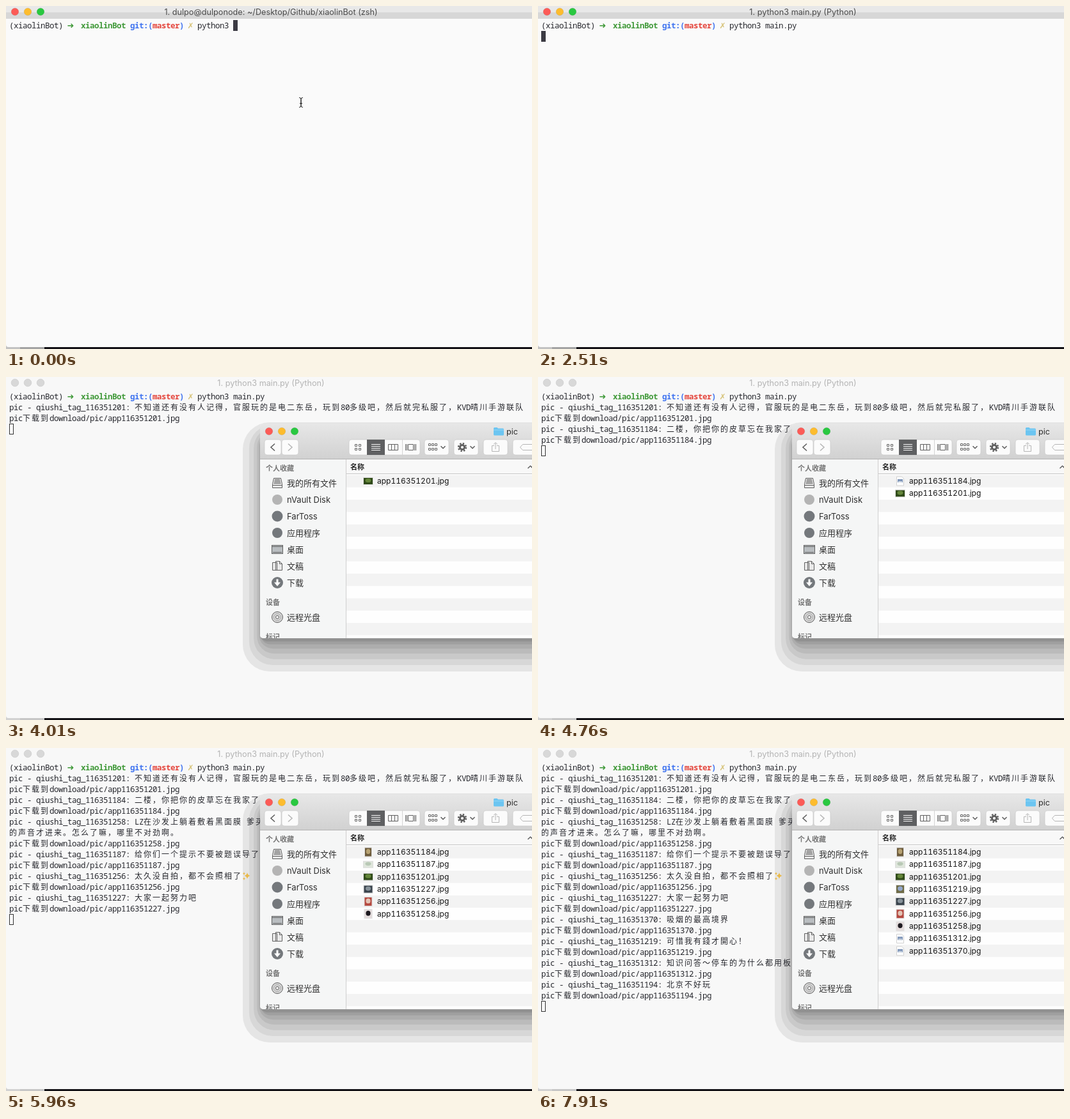
These frames come from a looping animation (822x537 px, 8 s). An HTML page:

```html
<!DOCTYPE html>
<html lang="zh-CN">
<head>
<meta charset="utf-8">
<title>Terminal download</title>
<style>
  html, body { margin: 0; width: 100%; height: 100%; overflow: hidden; background: #111; }
  svg { display: block; width: 822px; height: 537px; }
  text { white-space: pre; }
  .mono { font: 500 12.5px 'Noto Sans Mono', monospace; letter-spacing: -.5px; fill: #26272d; }
  .wide { font: 12px 'Noto Sans CJK SC', 'Noto Sans CJK', sans-serif; letter-spacing: 2px; fill: #26272d; }
  .bold { font-weight: 700; }
  .sign { font: 13px 'DejaVu Sans', sans-serif; }
  .ui { font: 12.7px Inter, 'Noto Sans CJK SC', 'Noto Sans CJK', sans-serif; fill: #2f2f2f; }
  .side { font-size: 13px; }
  .head { font-size: 11px; font-weight: 700; fill: #747474; }
  .file { font-size: 12px; font-variant-numeric: tabular-nums; fill: #151515; }
  .line { fill: none; stroke: #606060; }
  .solid { fill: #74787c; }
</style>
</head>
<body>
<svg viewBox="0 0 822 537">
  <defs>
    <linearGradient id="bar" x2="0" y2="1">
      <stop offset=".48" stop-color="#e8e8e8"/><stop offset=".48" stop-color="#d7d7d7"/>
    </linearGradient>
    <linearGradient id="toolbar" x2="0" y2="1">
      <stop stop-color="#e7e7e7"/><stop offset="1" stop-color="#d1d1d1"/>
    </linearGradient>
    <clipPath id="window"><rect x="397" y="73" width="440" height="336" rx="5"/></clipPath>
    <g id="sparkle" fill="#e9b949">
      <path d="M8 -10q.7 4 4.5 5q-3.800 1-4.500 5q-.7-4-4.500-5q3.800-1 4.500-5z"/>
      <path d="M3 -11q.3 2 2 2.500q-1.700.5-2 2.500q-.3-2-2-2.500q1.700-.5 2-2.500zM3-3q.3 2 2 2.500q-1.700.5-2 2.500q-.3-2-2-2.500q1.700-.5 2-2.500z"/>
    </g>
    <path id="down" class="line" stroke-width="1.6" d="M-3.500-1.700L0 1.700L3.500-1.700"/>
  </defs>

  <g id="terminal"></g>

  <g id="finder" clip-path="url(#window)">
    <rect x="397" y="73" width="430" height="336" fill="#f8f8f8"/>
    <rect x="397" y="128" width="135" height="281" fill="#f5f6f6"/>
    <g id="files"></g>
    <path d="M531.500 128V409" stroke="#cfcfcf"/>
    <path d="M532 151.500H822" stroke="#c6c6c6"/>
    <rect x="397" y="73" width="430" height="55" fill="url(#toolbar)"/>
    <path d="M397 128.500H822" stroke="#b4b4b4"/>
    <g id="buttons"></g>

    <path d="M762 80.500q0-1.500 1.500-1.500h4l1.500 1.500h7.500q1.500 0 1.500 1.500v8q0 1.500-1.500 1.500h-13q-1.500 0-1.500-1.500z" fill="#6cc5f1"/>
    <path d="M762 83h16" stroke="#93d7f7"/>
    <text class="ui" x="782" y="90">pic</text>

    <g class="line" stroke-width="1.6">
      <path d="M420 104.500l-6 5.500 6 5.500"/>
      <path d="M441 104.500l6 5.500-6 5.500" stroke="#b8b8b8"/>
    </g>
    <rect x="564" y="98" width="28" height="24" fill="#5f6062"/>
    <path d="M571 105.500h14M571 108.500h14M571 111.500h14M571 114.500h14" stroke="#fff"/>
    <path d="M619.500 98v24" stroke="#d4d4d4"/>
    <g class="line">
      <path d="M545.500 105.500h3v3h-3zM551.500 105.500h3v3h-3zM545.500 111.500h3v3h-3zM551.500 111.500h3v3h-3z"/>
      <path d="M597.500 105.500h15v9h-15zM602.500 105.500v9M607.500 105.500v9"/>
      <path d="M628.500 105.500h8v9h-8zM624.500 105v10M626.500 105v10M638.500 105v10M640.500 105v10"/>
      <path d="M660.500 104.500h3v3h-3zM665.500 104.500h3v3h-3zM670.500 104.500h3v3h-3zM660.500 111.500h3v3h-3zM665.500 111.500h3v3h-3zM670.500 111.500h3v3h-3z"/>
      <circle cx="713" cy="110" r="3.600" stroke-width="3"/>
      <circle cx="713" cy="110" r="6" stroke-width="2.400" stroke-dasharray="2.400 2.312"/>
    </g>
    <use href="#down" x="683" y="110"/>
    <use href="#down" x="729" y="110"/>
    <g class="line" style="stroke:#b5b5b5">
      <path d="M763 107.500h-3.500v9h11v-9h-3.500M765 113v-10M762 105.500l3-3 3 3"/>
      <path d="M803.500 110l4-4.500h16v9h-16z"/>
    </g>

    <text class="ui head" x="538" y="145" style="fill:#222">名称</text>
    <path class="line" stroke-width="1.500" d="M815.500 143l4-3.700 4 3.700"/>

    <g id="sidebar"></g>
    <g class="line">
      <path d="M418.500 158.500h11l2 9v6h-15v-6z" fill="#e6e6e6"/>
      <path d="M420 160.500h8M419.500 162.500h9M419 164.500h10M418.500 166.500h11M416.500 169.500h15"/>
      <rect x="415.500" y="263.500" width="17" height="13" fill="#b9bdc0"/>
      <path d="M415.500 265.500h17M417 274.500h14"/>
      <path d="M416.500 290.500h7v12h-7zM421.500 288.500h6l4 4v10h-10zM427.500 288.500v4h4" fill="#e9e9e9"/>
      <circle cx="424" cy="376" r="8.500" fill="#d8d8d8"/>
      <circle cx="424" cy="376" r="5.500" stroke="#a5a5a5"/>
      <circle cx="424" cy="376" r="2.500" fill="#f4f4f4"/>
    </g>
    <g class="solid">
      <circle cx="424" cy="192" r="8" fill="#b4b4b4"/>
      <circle cx="424" cy="218" r="8.500"/>
      <circle cx="424" cy="244" r="8"/>
      <circle cx="424" cy="322" r="9"/>
    </g>
    <path d="M422.500 316.500h3v5h3.500l-5 6-5-6h3.500z" fill="#fff"/>
  </g>
</svg>

<script>
const LOOP = 8000, CELL = 7, ROW = 17, NEVER = Infinity;
const RUN_AT = 1480, PYTHON_AT = 1930, FINDER_AT = 2960, STRIPES_AT = 4010;
const byId = id => document.getElementById(id);

const typing = [[0, ''], [300, 'm'], [450, 'ma'], [590, 'mai'], [740, 'main.py ']];
const pointerPath = [[0, 461, 151], [2080, 520, 149], [2220, 640, 143], [2360, 770, 136], [2510, 840, 130]];

// id, message time, saved time, listed time, thumbnail time, message rows
const posts = [
  [1201, 3710, 3860, 4010, 4010, ['不知道还有没有人记得，官服玩的是电二东岳，玩到80多级吧，然后就完私服了，KVD晴川手游联队']],
  [1184, 4460, 4610, 4760, 5210, ['二楼，你把你的皮草忘在我家了']],
  [1258, 4910, 4910, 5210, 5360, ['LZ在沙发上躺着敷着黑面膜 爹买', '的声音才进来。怎么了嘛，哪里不对劲啊。']],
  [1187, 5060, 5060, 5210, 5360, ['给你们一个提示不要被题误导了']],
  [1256, 5360, 5360, 5810, 5960, ['太久没自拍，都不会照相了✨']],
  [1227, 5660, 5660, 5810, 5960, ['大家一起努力吧']],
  [1370, 6260, 6260, 6710, NEVER, ['吸烟的最高境界']],
  [1219, 7010, 7010, 6710, 7910, ['可惜我有錢才開心！']],
  [1312, 7610, 7610, 7910, NEVER, ['知识问答～停车的为什么都用板']],
  [1194, 7760, 7760, NEVER, NEVER, ['北京不好玩']],
].map(([id, saidAt, savedAt, listedAt, thumbAt, message]) =>
  ({ name: '11635' + id, id, saidAt, savedAt, listedAt, thumbAt, message }));

// width, height, base colour, accent colour
const thumbs = {
  1184: [11, 14, '#6d5b3c', '#b7a272'], 1187: [15, 10, '#dfe6dc', '#b9c9b6'],
  1201: [15, 11, '#2f4a18', '#64863a'], 1219: [13, 13, '#6f6c48', '#94a8cc'],
  1227: [14, 12, '#39434c', '#87929a'], 1256: [12, 14, '#b5483f', '#e3c3b4'],
  1258: [12, 14, '#e4dcdc', '#1d1a20'],
};

const rect = (x, y, w, h, fill, more = '') =>
  `<rect x="${x}" y="${y}" width="${w}" height="${h}" fill="${fill}" ${more}/>`;
const label = (x, y, text, cls, style = '') =>
  `<text x="${x}" y="${y}" class="${cls}" style="${style}">${text}</text>`;
const latest = (steps, t) => steps.filter(step => step[0] <= t).pop();

const lights = (x, y, active = true) => ['#fc5b57', '#fdbc2e', '#29c840'].map((color, i) =>
  `<circle cx="${x + i * 20}" cy="${y}" r="5.800" fill="${active ? color : '#d8d8d8'}"
    stroke="${active ? '#0002' : '#c6c6c6'}" stroke-width=".6"/>`).join('');

// Terminal grid: CJK characters take two cells.
function printLine(row, text, col = 0, color = '', cls = '') {
  return text.match(/✨|[ -~]+|[^ -~✨]+/g).map(run => {
    const wide = run > '~', x = 5 + col * CELL, y = (wide ? 35 : 34.5) + row * ROW;
    col += run.length * (wide ? 2 : 1);
    if (run === '✨') return `<use href="#sparkle" x="${x}" y="${y}"/>`;
    return label(x, y, run, `${wide ? 'wide' : 'mono'} ${cls}`, color && `fill:${color}`);
  }).join('');
}

const prompt = printLine(0, '(xiaolinBot)')
  + label(95.5, 35, '➜', 'sign bold', 'fill:#429a3b')
  + printLine(0, 'xiaolinBot', 16, '#429a3b', 'bold')
  + printLine(0, 'git:(', 27, '#4074f0', 'bold')
  + printLine(0, 'master', 32, '#e4463d', 'bold')
  + printLine(0, ')', 38, '#4074f0', 'bold')
  + label(283.5, 35, '✗', 'sign bold', 'fill:#d6c277;font-size:12px')
  + printLine(0, 'python3 ', 42);

const shadow = Array.from({ length: 7 }, (_, i) => {
  const spread = 1 - i / 6, gray = 229 - 14 * i;
  const x = 397 - 27 * spread ** 2.5, y = 71 + 4 * i, bottom = 414 + 47 * spread ** 1.3;
  return rect(x, y, 500, bottom - y, `rgb(${gray},${gray},${gray})`, `rx="${42 - 5 * i}"`);
}).join('');

function titleAt(t) {
  if (t < RUN_AT) return '1. dulpo@dulponode: ~/Desktop/Github/xiaolinBot (zsh)';
  return `1. python3 main.py (${t < PYTHON_AT ? 'zsh' : 'Python'})`;
}

function pointer(t) {
  const [, x, y] = latest(pointerPath, t);
  const shape = 'M-3-7.500q3 0 3 2v11q0 2-3 2M3-7.500q-3 0-3 2v11q0 2 3 2M-2 1.500h4';
  return `<g transform="translate(${x} ${y})" fill="none"><path d="${shape}" stroke="#fff" stroke-width="2.500"/>
    <path d="${shape}" stroke="#222"/></g>`;
}

function drawTerminal(t) {
  const active = t < FINDER_AT, typed = latest(typing, t)[1];
  let html = rect(0, 530, 22, 7, active ? '#c2c2c2' : '#d2d2d2')
    + rect(22, 530, 38, 7, active ? '#a3a3a3' : '#c6c6c6') + rect(60, 530, 762, 7, '#131216')
    + `<path d="M0 0H822V534H4Q0 534 0 530z" fill="${active ? '#fafafa' : '#f8f8f8'}"/>`
    + (active ? rect(0, 0, 822, 20, 'url(#bar)') : '')
    + lights(14, 9, active)
    + label(414, 14, titleAt(t), 'ui', `text-anchor:middle;fill:${active ? '#4a4a4a' : '#b4b4b4'}`)
    + (active ? '' : shadow) + prompt;
  if (typed) html += printLine(0, typed, 50);

  let row = t < RUN_AT ? 0 : 1;
  const col = row ? 0 : 50 + typed.length;
  for (const { name, saidAt, savedAt, message } of posts) {
    if (t >= saidAt) message.forEach((text, i) => {
      html += printLine(row++, i ? text : `pic - qiushi_tag_${name}: ${text}`);
    });
    if (t >= savedAt) html += printLine(row++, `pic下载到download/pic/app${name}.jpg`);
  }
  const x = 5 + col * CELL, y = 22 + row * ROW;
  return html + (active
    ? rect(x, y, CELL, ROW, '#3b3a43') + pointer(t)
    : rect(x + .5, y + .5, CELL - 1, ROW - 1, 'none', 'stroke="#333"'));
}

function fileIcon(id, y, ready) {
  if (!ready) return `<path d="M560.500 ${y - 7}h8l3 3v11h-11z" fill="#fff" stroke="#d0d0d0"/>`
    + rect(562, y - 3, 8, 5, '#7d94b8') + rect(563, y, 6, 2, '#c9d3df');
  const [w, h, base, accent] = thumbs[id];
  return rect(566 - w / 2, y - h / 2, w, h, base, 'stroke="#ddd"')
    + `<ellipse cx="566" cy="${y - 1}" rx="${w * .3}" ry="${h * .28}" fill="${accent}"/>`;
}

function drawFiles(t) {
  let html = '';
  if (t >= STRIPES_AT) {
    html += rect(532, 152, 290, 257, '#fefefe');
    for (let k = 0; k < 14; k += 2) html += rect(532, 153.5 + k * 19.3, 290, 19.3, '#f3f3f3');
  }
  const listed = posts.filter(post => t >= post.listedAt).sort((a, b) => a.id - b.id);
  return html + listed.map(({ id, name, thumbAt }, k) => {
    const y = 163 + k * 19.35;
    return fileIcon(id, y, t >= thumbAt) + label(580, y + 4, `app${name}.jpg`, 'ui file');
  }).join('');
}

byId('buttons').innerHTML = lights(411, 85)
  + [[404, 26], [431, 26], [536, 111], [654, 38], [700, 38], [746, 38], [792, 38]].map(([x, w]) =>
    rect(x, 98, w, 24, '#fbfbfb', 'rx="4" stroke="#c4c4c4" stroke-width=".6"')).join('');

byId('sidebar').innerHTML =
  ['我的所有文件', 'nVault Disk', 'FarToss', '应用程序', '桌面', '文稿', '下载'].map((text, i) =>
    label(439, 171 + i * 26, text, 'ui side')).join('')
  + label(439, 381, '远程光盘', 'ui side')
  + [['个人收藏', 147], ['设备', 357], ['标记', 411]].map(([text, y]) => label(406, y, text, 'ui head')).join('');

const shown = {};
function update(id, html) {
  if (shown[id] !== html) byId(id).innerHTML = shown[id] = html;
}

const start = performance.now();
function frame() {
  const t = (performance.now() - start) % LOOP;
  update('terminal', drawTerminal(t));
  update('files', drawFiles(t));
  byId('finder').style.display = t < FINDER_AT ? 'none' : '';
  requestAnimationFrame(frame);
}
frame();
</script>
</body>
</html>
```
